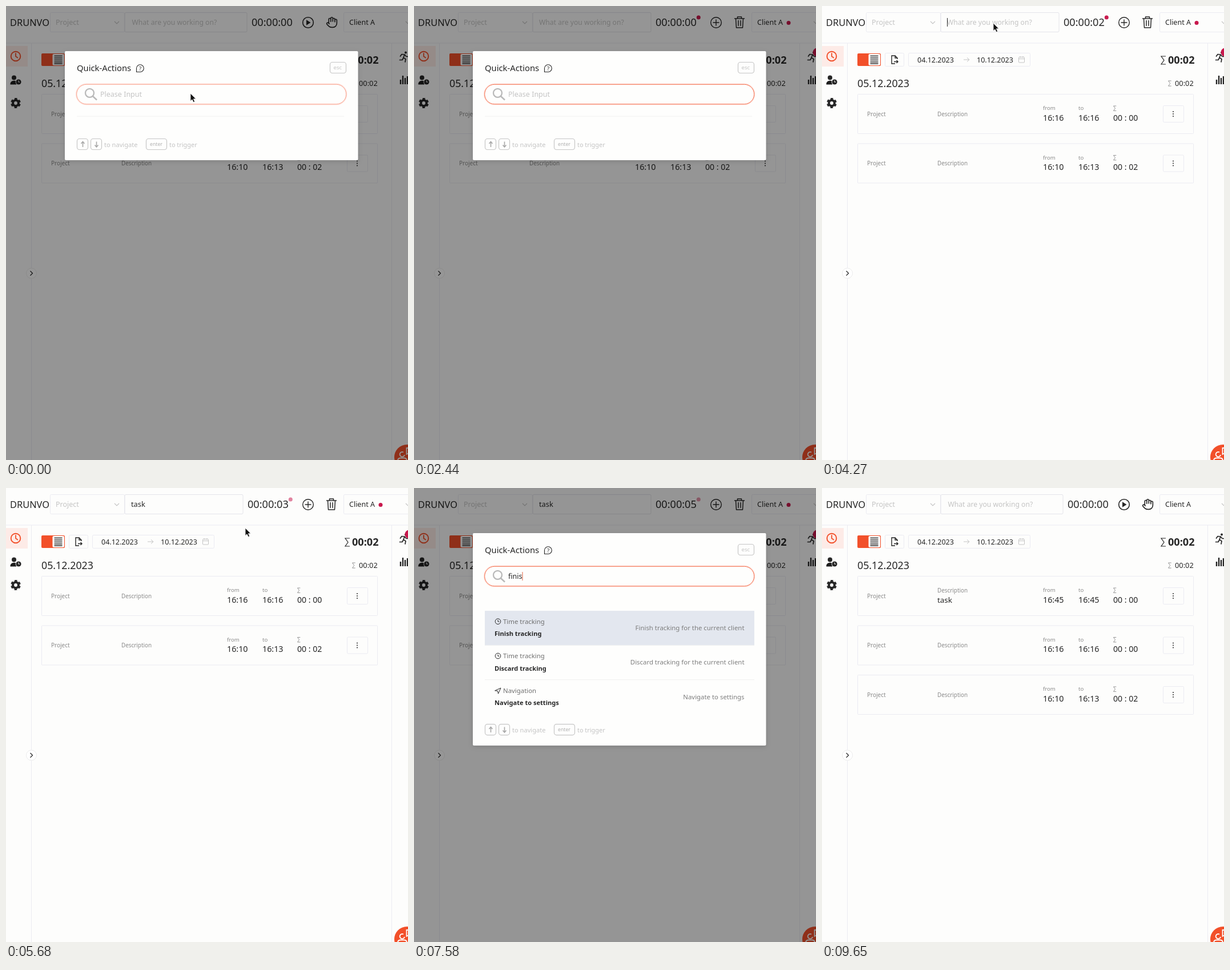
These frames come from a looping animation (704 by 795 pixels, 9890 ms). An HTML page:

```html
<!DOCTYPE html>
<html lang="en">
<head>
<meta charset="utf-8">
<title>Quick actions</title>
<style>
html, body { margin: 0; width: 100%; height: 100%; overflow: hidden; background: #fdfdfc; }
svg { display: block; width: 704px; height: 795px; font-family: "Noto Sans", "Open Sans", sans-serif; }
text { white-space: pre; }
</style>
</head>
<body>
<svg id="stage" viewBox="0 0 704 795" xmlns="http://www.w3.org/2000/svg"></svg>
<script>
const LOOP = 9890, INK = '#262626', GREY = '#8a8a8a', PALE = '#c4c4c4', LINE = '#ebebf2',
  ORANGE = '#f2502a', RED = '#c8184c';

const txt = (s, x, y, size, fill = INK, more = '') =>
  `<text x="${x}" y="${y}" font-size="${size}" fill="${fill}" ${more}>${s}</text>`;
const box = (x, y, w, h, r = 0, fill = 'none', stroke = 'none', more = '') =>
  `<rect x="${x}" y="${y}" width="${w}" height="${h}" rx="${r}" fill="${fill}" stroke="${stroke}" ${more}/>`;
const path = (d, stroke = INK, w = 1, more = '') =>
  `<path d="${d}" fill="none" stroke="${stroke}" stroke-width="${w}" ${more}/>`;
const dot = (x, y, r, fill = INK, more = '') =>
  `<circle cx="${x}" cy="${y}" r="${r}" fill="${fill}" ${more}/>`;
const ring = (x, y, r, stroke, w) => dot(x, y, r, 'none', `stroke="${stroke}" stroke-width="${w}"`);
const group = (id, s, more = '') => `<g id="${id}" ${more}>${s}</g>`;
const round = 'stroke-linecap="round" stroke-linejoin="round"';
const sigma = (x, y, k, c, w) =>
  path(`M${x + 8 * k} ${y}H${x}L${x + 5 * k} ${y + 7 * k}L${x} ${y + 14 * k}H${x + 8 * k}`, c, w);

function header() {
  const play = ring(529, 29, 9.3, INK, 1.6) + '<path d="M526 24.3L533.5 29L526 33.7Z" fill="#262626"/>';
  const hand = path('M18 11V6a2 2 0 0 0-4 0M14 10V4a2 2 0 0 0-4 0v2M10 10.5V6a2 2 0 0 0-4 0v8M18 8a2 2 0 1 1 4 0v6a8 8 0 0 1-8 8h-2c-2.8 0-4.5-.86-5.99-2.34l-3.6-3.6a2 2 0 0 1 2.83-2.82L7 15',
    INK, 1.9, `transform="translate(560 18) scale(.88)" ${round}`);
  const plus = ring(529, 29, 9.3, INK, 1.4) + path('M523.5 29H534.5M529 23.5V34.5', INK, 1.4);
  const bin = path('M561.5 22H578.5M566.5 22V19H573.5V22M563.5 22L564.5 38H575.5L576.5 22M568 25.5V34.5M572 25.5V34.5', INK, 1.5, round);
  return path('M0 65H704', LINE) +
    txt('DRUNVO', 7, 35, 16.4) +
    box(77.5, 11.5, 130, 34, 2, 'none', LINE) + txt('Project', 87, 33, 12.5, PALE) +
    path('M190 27L194 31L198 27', PALE, 1.1) +
    '<rect id="field" x="208" y="11.5" height="34" rx="2" fill="none" stroke="#e4e4ea"/>' +
    '<text id="desc" y="33"/>' + '<path id="descCaret" stroke="#262626" fill="none"/>' +
    '<text id="timer" y="35" font-size="18.1" fill="#262626"/>' +
    group('idle', play + hand) +
    group('busy', plus + bin + dot(498.3, 20, 3.5, RED, 'id="pulse"') + dot(656, 29.5, 3.5, RED) + dot(706, 81, 7.5, RED)) +
    box(591.5, 11.5, 130, 34, 2, 'none', LINE) + txt('Client A', 601, 33, 12.5) +
    path('M700 27L704 31', PALE, 1.1);
}

function rails() {
  const user = dot(14, 125.5, 4) + '<path d="M7.5 137.5Q7.5 130.8 14 130.8Q17 130.8 18 132V137.5Z" fill="#1d1d1d"/>' +
    dot(22, 133, 5.4, '#fdfdfc') + dot(22, 133, 4.6) + path('M22 130.4V133.2H24', '#fff', 1);
  const gear = ring(17, 170, 4.9, INK, 4) +
    dot(17, 170, 7.4, 'none', 'stroke="#262626" stroke-width="3" stroke-dasharray="4.4 3.35" transform="rotate(13 17 170)"');
  const run = dot(700, 81.5, 2) + path('M690.5 88L693 84.5L698 85L696 90.5L700 93L699 98M696 90.5L694 94.5H689.5M698 85L701 88.5H704', INK, 1.7, round);
  const bars = path('M691 137V129M695 137V122M699 137V126M703 137V123', INK, 2.4);
  const fab = dot(702, 790, 22, ORANGE) +
    path('M686 795Q687 791.5 691 791.5H697Q701 791.5 702 795M698 786A4.2 4.2 0 1 1 696 781.5M704 774H701.5V785L704 783.5', '#fff', 1.8);
  return path('M44.5 65V795M675.5 65V795', LINE) +
    box(0, 70, 38, 36, 0, '#fdebe7') + ring(17, 88, 8.3, ORANGE, 1.9) +
    path('M17 83V88.3L20.3 90.5', ORANGE, 1.8, round) + user + gear +
    dot(44.5, 468, 9, '#fff', 'stroke="#ececec"') + path('M42.5 464L46.5 468L42.5 472', INK, 1.2) +
    run + bars + fab;
}

function toolbar() {
  return box(62, 83, 41, 22, 2, ORANGE) + box(81.5, 84, 20.5, 20, 2, '#fff') +
    path('M84.5 87.5H98.5M84.5 91H98.5M84.5 94.5H98.5M84.5 98H98.5M84.5 101H98.5', INK, 1.5) +
    box(110.5, 82.5, 33, 23, 2, 'none', LINE) +
    path('M132 93V91L128 87H122V101H128M128 87V91H132M126 97.5H133M130.5 95L133 97.5L130.5 100', INK, 1.4) +
    box(151.5, 82.5, 213, 23, 2, 'none', LINE) +
    txt('04.12.2023', 167, 98.5, 12.5) + txt('10.12.2023', 271, 98.5, 12.5) +
    path('M248 94H258M254 90.5L258 94L254 97.5', PALE) +
    box(344.5, 89.5, 10, 9.5, 1, 'none', PALE) + path('M344.5 92.5H354.5M347 88V90.5M352 88V90.5', PALE) +
    sigma(594, 88, 1, INK, 1.2) + txt('00:02', 606, 100.5, 18.1, INK, 'font-weight="700"') +
    txt('05.12.2023', 62, 141.5, 17.8) +
    sigma(606.5, 131, .65, GREY, .9) + txt('00:02', 618, 140, 12.8);
}

function card(i, from, to, sum, task) {
  const y = 154.5 + i * 86.5;
  const cell = (name, x, val) => txt(name, x, y + 27.7, 9.6, GREY) + txt(val, x, y + 46.3, 14.3);
  return box(62.5, y, 588, 69, 1, 'none', LINE) +
    txt('Project', 79, y + 38.2, 10, GREY) +
    txt('Description', 202, y + (task ? 28 : 38.2), 9.9, GREY) +
    (task ? txt(task, 202, y + 46.3, 13.4) : '') +
    cell('from', 387, from) + cell('to', 449, to) +
    sigma(510.5, y + 20.5, .6, GREY, .9) + txt(sum, 510, y + 46.3, 14.1) +
    box(597.5, y + 20, 36, 29, 2, 'none', LINE) +
    [30.5, 34.5, 38.5].map(d => dot(615, y + d, 1)).join('');
}
const OLD = [['16:16', '16:16', '00 : 00'], ['16:10', '16:13', '00 : 02']];
const NEW = [['16:45', '16:45', '00 : 00', 'task'], ...OLD];
const cards = list => list.map((c, i) => card(i, ...c)).join('');

const track = (verb) => ['Time tracking', verb + ' tracking', verb + ' tracking for the current client'];
const nav = (to) => ['Navigation', 'Navigate to ' + to, 'Navigate to ' + to];
const START = [track('Start'), nav('statistics'), nav('settings'), nav('time tracking'), nav('projects'),
  nav('clients'), nav('users'), nav('profile'), nav('export')];
const FINISH = [track('Finish'), track('Discard'), nav('settings'), nav('statistics'), nav('projects')];
const ROW = 60.35;

function row([kind, title, note], i) {
  const y = 215 + i * ROW;
  const icon = kind === 'Navigation'
    ? path(`M142 ${y + 19}L152 ${y + 14.5}L147.5 ${y + 24.5}L146.5 ${y + 20}Z`, INK, 1, round)
    : ring(147, y + 18.7, 4.8, INK, 1) + path(`M147 ${y + 16}V${y + 19}H149.5`, INK, 1);
  return (i ? path(`M124 ${y}H596`, '#efefef') : box(124, y, 472, ROW, 0, '#e3e7ef')) + icon +
    txt(kind, 156, y + 23, 11.4, '#6f6f6f') +
    txt(title, 141, y + 44.2, 11.1, INK, 'font-weight="600"') +
    txt(note, 578.5, y + 34, 11.4, '#7d7d7d', 'text-anchor="end"');
}

function modal() {
  const key = (x, w) => box(x + .5, 232.5, w, 19, 4, 'none', '#c6c6c6', 'stroke-width="1.2"');
  const arrow = (x, a, b) => path(`M${x} ${a}V${b}M${x - 3} ${b + Math.sign(a - b) * 3.5}L${x} ${b}L${x + 3} ${b + Math.sign(a - b) * 3.5}`, '#a8a8a8', 1.6);
  return '<rect id="panel" x="103" y="79" width="513.5" rx="2" fill="#fefefd" filter="url(#shade)"/>' +
    txt('Quick-Actions', 124, 113.7, 14.8, INK, 'font-weight="500"') +
    path('M228.5 115.5V109A6.4 6.4 0 1 1 235 115.5Z', INK, 1.1) +
    txt('?', 235, 113, 9.5, INK, 'text-anchor="middle" font-weight="500"') +
    box(567.5, 98.5, 28, 19, 4, 'none', '#c6c6c6', 'stroke-width="1.2"') + txt('esc', 573.5, 111, 9.6, PALE) +
    box(123.7, 137.3, 472, 34.5, 17.2, 'none', '#fb6a48', 'id="glow" stroke-width="3.5"') +
    box(123.7, 137.3, 472, 34.5, 17.2, '#fefefd', '#f0694a', 'id="edge"') +
    ring(146.5, 152.3, 7.5, '#b9b9b9', 2.3) + path('M152 158L159 164.5', '#b9b9b9', 2.5) +
    '<text id="query" x="165" y="158.7" font-size="12.5"/>' + path('', '#e0603f', 1, 'id="caret"') +
    path('M124 193H592', '#f0f0f0', 1, 'id="rule"') + group('rows', '') +
    group('keys', key(124, 19) + key(148, 19) + key(245, 36) + arrow(134.5, 247, 237.5) + arrow(158.5, 237.5, 247) +
      txt('enter', 252, 245, 8.7, '#b0b0b0') + txt('to navigate', 172, 246.5, 11.1, PALE) + txt('to trigger', 286, 246.5, 10.9, PALE));
}

const stage = document.getElementById('stage');
stage.innerHTML =
  '<defs><filter id="shade" x="-10%" y="-10%" width="120%" height="125%"><feDropShadow dx="0" dy="2" stdDeviation="4" flood-opacity=".14"/></filter></defs>' +
  box(0, 0, 704, 795, 0, '#fdfdfc') + rails() + header() + toolbar() +
  group('two', cards(OLD)) + group('three', cards(NEW)) +
  box(0, 0, 704, 795, 0, '#000', 'none', 'id="mask"') + group('modal', modal()) +
  '<path id="mouse" d="M0 0V13.5L3 10.8L5.2 15.6L7.6 14.5L5.4 9.8H9.6Z" fill="#111" stroke="#fff" stroke-width=".8"/>';

const $ = {};
for (const e of stage.querySelectorAll('[id]')) $[e.id] = e;
const set = (e, o) => { for (const k in o) e.setAttribute(k, o[k]); };
const show = (e, on) => set(e, { visibility: on ? 'visible' : 'hidden' });
const clamp = x => Math.max(0, Math.min(1, x));
const ramp = (t, a, b) => clamp((t - a) / (b - a));
const inOut = p => p * p * (3 - 2 * p);
const out5 = p => 1 - Math.pow(1 - p, 5);

const RUN = 2370, STOP = 7830, ZERO = 2200;
// [time, query, result count]
const KEYS = [[0, '', 0], [1000, 's', 7], [1270, 'st', 9], [1540, 'sta', 2], [1810, 'star', 1], [RUN, '', 0],
  [6610, 'f', 5], [6850, 'fi', 4], [7090, 'fin', 3], [7340, 'fini', 3], [7580, 'finis', 3], [STOP, '', 0]];
// [start, end, x0, y0, x1, y1]
const MOVES = [[0, 1000, 323, 153, 323, 153], [3300, 3950, 323, 153, 300, 30], [3950, 4400, 300, 30, 300, 30],
  [5050, 5340, 300, 30, 419, 70], [5340, 6610, 419, 70, 419, 70],
  [8810, 9420, 422, 87, 590, 797], [9580, 9650, 689, 783, 692, 785]];
const within = (t, a, b) => t >= a && t < b;
let rowsKey = '';

function drawHeader(t) {
  const on = within(t, RUN, STOP), n = on ? Math.floor((t - ZERO) / 1000) : 0;
  show($.busy, on);
  show($.idle, !on);
  set($.field, { width: on ? 207 : 214 });
  $.timer.textContent = '00:00:0' + n;
  set($.timer, { x: on ? 423 : 430 });
  set($.pulse, { opacity: .7 + .3 * Math.cos((t - RUN) / 1000 * Math.PI) });
  const word = on ? 'task'.slice(0, Math.max(0, Math.ceil((t - 4399) / 150))) : '';
  $.desc.textContent = word || 'What are you working on?';
  set($.desc, { x: on ? 219 : 220.5, fill: word ? INK : PALE, 'font-size': word ? 12.8 : 12.15 });
  show($.descCaret, within(t, 3950, 5300));
  const x = 219.5 + (word ? $.desc.getComputedTextLength() : 0);
  set($.descCaret, { d: `M${x} 21V36` });
  show($.two, t < STOP);
  show($.three, t >= STOP);
}

function drawModal(t) {
  const second = t > 4000, end = second ? 7880 : 2460;
  const open = second ? ramp(t, 6040, 6340) : 1;
  const shut = inOut(ramp(t, end, end + 300));
  const size = open < 1 ? .2 + .8 * out5(open) : 1 - .8 * shut;
  const alpha = open < 1 ? out5(open) : 1 - shut;
  const on = open > 0 && shut < 1;
  show($.modal, on);
  set($.mask, { opacity: on ? .41 * alpha : 0 });
  set($.modal, { opacity: alpha, transform: `translate(359.7 174.5) scale(${size}) translate(-359.7 -174.5)` });

  const [, query, count] = KEYS.filter(k => k[0] <= t).pop();
  const key = second + '/' + count;
  if (key !== rowsKey) {
    rowsKey = key;
    $.rows.innerHTML = (second ? FINISH : START).slice(0, count).map(row).join('');
  }
  set($.panel, { height: 191 + count * ROW });
  set($.keys, { transform: `translate(0 ${count * ROW})` });
  set($.rule, { opacity: count ? 0 : 1 });
  $.query.textContent = query || 'Please Input';
  set($.query, { fill: query ? INK : PALE });
  const x = 165.5 + (query ? $.query.getComputedTextLength() : 0);
  set($.caret, { d: `M${x} 147V162` });
  const lit = on && (within(t, 270, 770) || within(t, 1000, 2210) || within(t, 6150, STOP));
  const focus = second ? ramp(t, 6140, 6340) : ramp(t, 40, 400);
  set($.caret, { opacity: lit ? .4 + .6 * focus : 0 });
  set($.edge, { stroke: '#f4623f', 'stroke-opacity': .55 + .4 * focus });
  set($.glow, { opacity: .18 });
}

function drawMouse(t) {
  const m = MOVES.find(m => within(t, m[0], m[1]));
  show($.mouse, !!m);
  if (!m) return;
  const p = inOut(ramp(t, m[0], m[1]));
  set($.mouse, { transform: `translate(${m[2] + (m[4] - m[2]) * p} ${m[3] + (m[5] - m[3]) * p})` });
}

function draw(t) {
  drawHeader(t);
  drawModal(t);
  drawMouse(t);
}

const begin = performance.now();
function tick() {
  draw((performance.now() - begin) % LOOP);
  requestAnimationFrame(tick);
}
tick();
</script>
</body>
</html>
```
